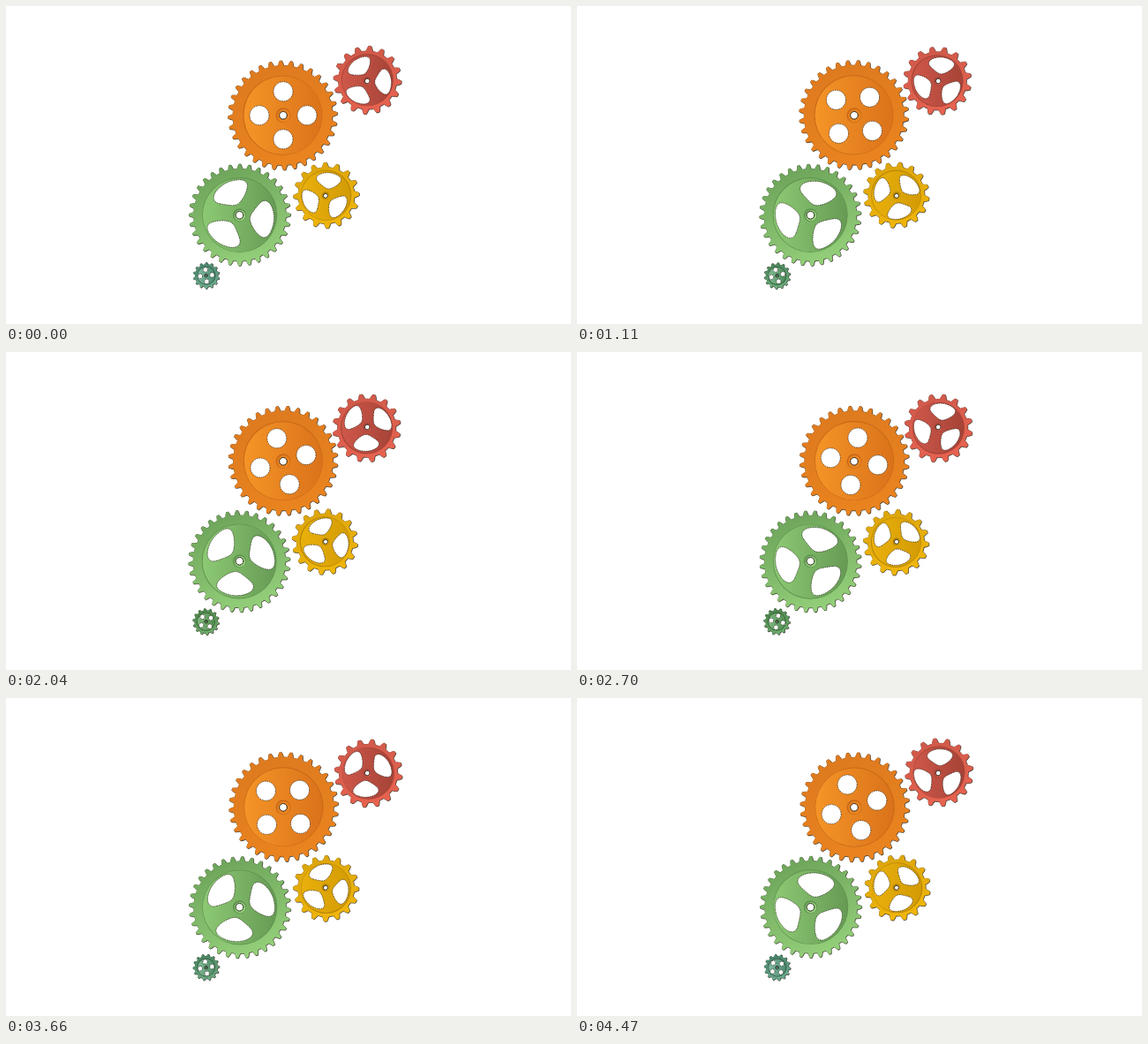
An HTML page with a canvas for the animation above (4.5 s loop, 640x360 px).

```html
<!DOCTYPE html>
<html>
<head>
<meta charset="utf-8">
<title>Gears</title>
<style>
html, body { margin: 0; width: 100%; height: 100%; overflow: hidden; background: #fff; }
canvas { display: block; }
</style>
</head>
<body>
<canvas id="stage" width="640" height="360"></canvas>
<script>
const ctx = document.getElementById('stage').getContext('2d');
const LOOP = 4500, STEP = 30, RAD = Math.PI / 180;

// r: tip radius, disk: recessed face, holes: 3 curved or 4 round windows,
// spin: degrees per second, turn: window angle at start, [sway, swayAt]: eccentric rim
const gears = [
  { x: 314, y: 123.8, r: 62, teeth: 32, depth: 5.5, disk: 45, holes: 4, holeAt: 27, holeR: 11,
    spin: 36.5, turn: 0, tooth: -92, sway: .7, swayAt: 180, boss: 8.5, bore: 4.3,
    rim: '#ea841f', rimDark: '#de7a1f', light: '#f59527', dark: '#da721a', edge: '#c96a18' },
  { x: 409.2, y: 85, r: 38.6, teeth: 16, depth: 5.5, disk: 29.5, holes: 3,
    spin: -73, turn: -3, tooth: -86, sway: 1.2, swayAt: -83, boss: 4.8, bore: 2.8,
    rim: '#e8634f', rimDark: '#cf594a', light: '#cf584a', dark: '#a54337', edge: '#a94438' },
  { x: 362, y: 214.8, r: 37.3, teeth: 16, depth: 5.3, disk: 28.5, holes: 3,
    spin: -73, turn: 36, tooth: -92, sway: .9, swayAt: -31, boss: 4.5, bore: 2.5,
    rim: '#f0b60b', rimDark: '#dca50c', light: '#e9b00c', dark: '#d39b05', edge: '#b98704' },
  { x: 264.5, y: 236.8, r: 57.6, teeth: 32, depth: 5.3, disk: 42.5, holes: 3,
    spin: -73, turn: 4, tooth: -90, sway: .4, swayAt: -60, boss: 7.5, bore: 4.3,
    rim: '#94d07a', rimDark: '#6da45a', light: '#8dca74', dark: '#669a54', edge: '#5f9350' },
  { x: 226.7, y: 305.2, r: 15, teeth: 14, depth: 2.2, disk: 10.5, holes: 4, holeAt: 6.8, holeR: 2.6,
    spin: 73, turn: -6, tooth: -90, sway: .3, swayAt: 0, boss: 2.2, bore: 1 }
];

// Curved window as [angle, radius] for a face of radius 42
const windowShape = [[-38, 32], [-24, 38], [2, 40], [27, 40.5], [40, 38], [43, 28], [34, 16], [6, 11.3], [-25, 18]];

const polar = (deg, r) => [r * Math.cos(deg * RAD), r * Math.sin(deg * RAD)];

function circle(path, x, y, r) {
  path.moveTo(x + r, y);
  path.arc(x, y, r, 0, 7);
}

function rimPath(g, angle, cx, cy) {
  const path = new Path2D(), pitch = 360 / g.teeth;
  const outline = [[-.5, 1], [-.3, 1], [-.17, .3], [-.1, 0], [.1, 0], [.17, .3], [.3, 1]];
  for (let i = 0; i < g.teeth; i++) {
    for (const [a, down] of outline) {
      const [x, y] = polar(g.tooth + angle + (i + a) * pitch, g.r - down * g.depth);
      path.lineTo(cx + x, cy + y);
    }
  }
  path.closePath();
  return path;
}

function windowsPath(g, angle) {
  const path = new Path2D();
  for (let i = 0; i < g.holes; i++) {
    const a = angle + g.turn + i * 360 / g.holes;
    if (g.holes === 4) {
      circle(path, ...polar(a, g.holeAt), g.holeR);
      continue;
    }
    const pts = windowShape.map(([d, r]) => polar(a + d, r * g.disk / 42));
    const mid = (p, q) => [(p[0] + q[0]) / 2, (p[1] + q[1]) / 2];
    path.moveTo(...mid(pts[pts.length - 1], pts[0]));
    pts.forEach((p, k) => path.quadraticCurveTo(...p, ...mid(p, pts[(k + 1) % pts.length])));
    path.closePath();
  }
  circle(path, 0, 0, g.bore);
  return path;
}

function fillCircle(x, y, r, fill) {
  ctx.beginPath();
  ctx.arc(x, y, r, 0, 7);
  ctx.fillStyle = fill;
  ctx.fill();
}

function shade(r, from, to, deg) {
  const [x, y] = polar(deg, r);
  const fill = ctx.createLinearGradient(x, y, -x, -y);
  fill.addColorStop(0, from);
  fill.addColorStop(1, to);
  return fill;
}

function drawGear(g, t) {
  const angle = g.spin * t / 1000;
  const [cx, cy] = polar(g.swayAt + angle, g.sway);
  let { rim, rimDark, light, dark, edge } = g;
  if (!rim) {
    const hue = 135 + 18 * Math.cos(2 * Math.PI * t / LOOP);
    [rim, rimDark, light, dark, edge] = [56, 40, 62, 42, 28].map(l => `hsl(${hue},29%,${l}%)`);
  }
  ctx.save();
  ctx.translate(g.x, g.y);

  const body = rimPath(g, angle, cx, cy);
  const windows = windowsPath(g, angle);
  ctx.save();
  ctx.translate(.3, .3);
  ctx.fillStyle = ctx.strokeStyle = '#2b261c';
  ctx.lineWidth = .6;
  ctx.fill(body);
  ctx.stroke(body);
  ctx.restore();
  ctx.fillStyle = shade(g.r, rimDark, rim, -110);
  ctx.fill(body);

  fillCircle(cx, cy, g.disk, edge);
  fillCircle(cx * .5, cy * .5, g.disk - .8, shade(g.disk, light, dark, 180));
  fillCircle(0, 0, g.boss, edge);
  fillCircle(.5, .5, g.boss - 1.3, rim);

  ctx.fillStyle = '#fff';
  ctx.fill(windows);
  ctx.strokeStyle = 'rgba(30,26,18,.8)';
  ctx.lineWidth = .8;
  ctx.setLineDash([1.6, .9]);
  ctx.stroke(windows);
  ctx.setLineDash([]);
  ctx.beginPath();
  ctx.arc(0, 0, g.bore, 0, 7);
  ctx.stroke();
  ctx.restore();
}

function frame(now) {
  const t = Math.floor(now % LOOP / STEP) * STEP;
  ctx.fillStyle = '#fff';
  ctx.fillRect(0, 0, 640, 360);
  for (const g of gears) drawGear(g, t);
  requestAnimationFrame(frame);
}
requestAnimationFrame(frame);
</script>
</body>
</html>
```
